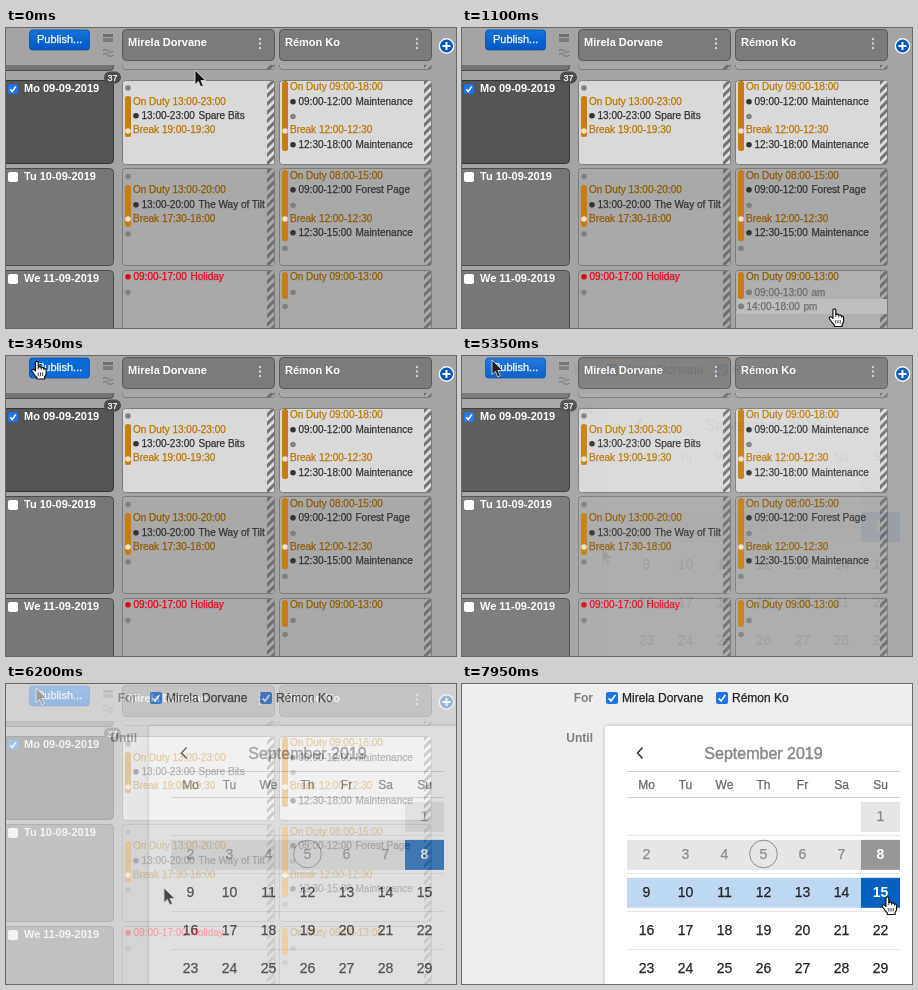
Recreate the animation shown at these times as an HTML page. Size 450 px wide and 300 px high, loop 8000 ms.

```html
<!DOCTYPE html>
<html lang="en">
<head>
<meta charset="utf-8">
<title>Roster publishing</title>
<style>
html, body { margin: 0; width: 100%; height: 100%; overflow: hidden; background: #a4a4a4; }
svg { display: block; width: 100vw; height: 100vh; font-family: "Liberation Sans", Arial, sans-serif; }
text { white-space: pre; stroke-width: .25px; }
</style>
</head>
<body>
<svg id="stage" viewBox="0 0 450 300">
  <defs>
    <linearGradient id="blue" x2="0" y2="1">
      <stop stop-color="#1672dc"/><stop offset="1" stop-color="#0058c4"/>
    </linearGradient>
    <pattern id="lightStripe" width="6" height="6" patternUnits="userSpaceOnUse" patternTransform="rotate(45)">
      <rect width="6" height="6" fill="#dcdcdc"/><rect x="3" width="3" height="6" fill="#747474"/>
    </pattern>
    <pattern id="dimStripe" width="6" height="6" patternUnits="userSpaceOnUse" patternTransform="rotate(45)">
      <rect width="6" height="6" fill="#a9a9a9"/><rect x="3" width="3" height="6" fill="#707070"/>
    </pattern>
    <filter id="soft" x="-10%" y="-10%" width="120%" height="120%"><feGaussianBlur stdDeviation="2"/></filter>
    <path id="arrow" d="M0 0V14.5L3.4 11.4L5.8 16.8L8.3 15.7L5.9 10.5H10.6Z" fill="#111" stroke="#e8e8e8" stroke-width=".8"/>
    <g id="hand" stroke="#111" stroke-width="1.2" stroke-linejoin="round">
      <path d="M-1.6 9.5V1.2Q-1.6 -.2 -.2 -.2T1.3 1.2V5.6Q3.8 4.4 4.2 6.3Q6.4 5.4 6.9 7.2Q9 6.7 9.1 8.6V12Q9 14 7.6 15.4V17.5H-.2V16Q-2.6 13.8 -4.7 10.3Q-5.9 8.4 -4.4 7.8Q-3.2 7.5 -1.6 9.5Z" fill="#fff"/>
      <path d="M1.3 11V14.5M3.5 11V14.5M5.7 11V14.5M1.3 5.5V8M4.2 6.3V8.3M6.9 7.2V8.8" stroke-width=".8"/>
    </g>
  </defs>
  <g id="roster"></g>
  <g id="dialog"></g>
</svg>
<script>
const NS = "http://www.w3.org/2000/svg";
const roster = document.getElementById("roster");
const dialog = document.getElementById("dialog");
const people = ["Mirela Dorvane", "Rémon Ko"];

function add(parent, tag, attrs, content) {
  const node = document.createElementNS(NS, tag);
  for (const key in attrs) node.setAttribute(key, attrs[key]);
  if (content !== undefined) node.textContent = content;
  parent.append(node);
  return node;
}
const box = (p, x, y, width, height, fill, more) => add(p, "rect", { x, y, width, height, fill, ...more });
const dot = (p, cx, cy, r, fill, more) => add(p, "circle", { cx, cy, r, fill, ...more });
const label = (p, x, y, size, fill, str, more) =>
  add(p, "text", { x, y, "font-size": size, fill, stroke: fill, ...more }, str);
const line = (p, d, stroke, width = 1) => add(p, "path", { d, stroke, "stroke-width": width, fill: "none" });
const bold = { "font-weight": "bold", stroke: "none" };

function checkbox(p, x, y, size, on) {
  box(p, x, y, size, size, on ? "#1d74e8" : "#fff", { rx: 2 });
  if (on) line(p, `M${x + size * .22} ${y + size * .53}l${size * .2} ${size * .22}l${size * .36} ${-size * .5}`, "#fff", 1.6);
}

// Roster
box(roster, 0, 0, 450, 300, "#a4a4a4");

function dayCell(y, height, fill, str, on) {
  box(roster, -6, y + .5, 113.5, height, fill, { rx: 4, stroke: on ? "#333" : "#4a4a4a" });
  if (!str) return;
  checkbox(roster, 2, y + 4, 10, on);
  label(roster, 18, y + 12, 11, "#fff", str, bold);
}
dayCell(20, 22, "#757575");
box(roster, 0, 0, 116, 37, "#a4a4a4");
dayCell(52, 83, "#555", "Mo 09-09-2019", true);
dayCell(140, 97, "#777", "Tu 10-09-2019");
dayCell(242, 80, "#777", "We 11-09-2019");
box(roster, 98, 43.5, 17, 12, "#4c4c4c", { rx: 6 });
label(roster, 106.5, 52.7, 9, "#fff", "37", { "text-anchor": "middle" });

function shiftCell(x, y, height, light) {
  box(roster, x - .5, y + .5, 152, height, light ? "#d9d9d9" : "#a9a9a9", { rx: 3, stroke: "#7c7c7c" });
  box(roster, x + 144, y + 1, 7, height - 1, `url(#${light ? "lightStripe" : "dimStripe"})`);
}
people.forEach((name, i) => {
  const x = 117 + i * 157;
  shiftCell(x, 20, 21);
  box(roster, x - 1, 0, 154, 37, "#a4a4a4");
  box(roster, x - .5, 1.5, 152, 31, "#7b7b7b", { rx: 4, stroke: "#575757" });
  label(roster, x + 5, 18, 11, "#fff", name, bold);
  [11, 15.5, 20].forEach(y => dot(roster, x + 137, y, 1.2, "#d0d0d0"));
  shiftCell(x, 52, 84, true);
  shiftCell(x, 140, 97);
  shiftCell(x, 242, 80);
});

// The hovered cell brightens and lists its open shifts.
const hints = add(roster, "g", {});
box(hints, 274, 243, 144, 57, "#fff", { opacity: .08 });
const hintRow = box(hints, 275, 271, 150, 15, "#bebebe");

const duty = (x, y, str, light) => label(roster, x, y, 10, light ? "#bd7600" : "#8f5a00", str);
function bar(x, y, height, pause) {
  box(roster, x, y, 6, height, "#c97d0c", { rx: 2.5 });
  if (pause) dot(roster, x + 3, pause, 2.8, "#f0dfc2");
}
function task(x, y, time, name, fill = "#333", parent = roster) {
  dot(parent, x, y - 3.3, 2.8, fill);
  label(parent, x + 5.5, y, 10, fill, time);
  label(parent, x + 62.5, y, 10, fill, name);
}
const spare = (x, y) => dot(roster, x, y, 2.8, "#808080");

spare(122, 60);
bar(119, 68, 41, 103);
duty(127, 77, "On Duty 13:00-23:00", true);
task(130, 91, "13:00-23:00", "Spare Bits");
duty(127, 105, "Break 19:00-19:30", true);

bar(276, 53, 70, 103);
duty(284, 62, "On Duty 09:00-18:00", true);
task(287, 77, "09:00-12:00", "Maintenance");
spare(287, 88.5);
duty(284, 105, "Break 12:00-12:30", true);
task(287, 120, "12:30-18:00", "Maintenance");

spare(122, 148.5);
bar(119, 157, 42, 191);
duty(127, 165, "On Duty 13:00-20:00");
task(130, 180, "13:00-20:00", "The Way of Tilt");
duty(127, 194, "Break 17:30-18:00");
spare(122, 206);

bar(276, 142, 71, 191);
duty(284, 151, "On Duty 08:00-15:00");
task(287, 165, "09:00-12:00", "Forest Page");
spare(287, 177.5);
duty(284, 194, "Break 12:00-12:30");
task(287, 208, "12:30-15:00", "Maintenance");
spare(279, 220.5);

task(122, 252, "09:00-17:00", "Holiday", "#f00014");
spare(122, 264.5);
bar(276, 244, 27);
duty(284, 252, "On Duty 09:00-13:00");
spare(287, 264.5);
spare(279, 278.5);
task(287, 267.5, "09:00-13:00", "am", "#6c6c6c", hints);
task(279, 281.5, "14:00-18:00", "pm", "#6c6c6c", hints);

const publish = box(roster, 23.5, 2, 60, 20, "url(#blue)", { rx: 3, stroke: "#0a4fa6", "stroke-width": .8 });
label(roster, 31, 15, 11, "#fff", "Publish...");
box(roster, 97, 6, 10, 3, "#707070");
box(roster, 97, 10, 10, 4, "#7b7b7b");
line(roster, "M97 23q2.5 -3 5 0t5 0M97 27q2.5 -3 5 0t5 0", "#7f7f7f", 1.3);
dot(roster, 440.5, 18, 7.2, "#0758b8", { stroke: "#f2f5f9", "stroke-width": 1.5 });
line(roster, "M436.5 18h8M440.5 14v8", "#fff", 2);

// Dialog
box(dialog, 0, 0, 450, 300, "#eee");
const right = { ...bold, "text-anchor": "end" };
label(dialog, 131, 18, 12, "#808080", "For", right);
label(dialog, 131, 58, 12, "#808080", "Until", right);
people.forEach((name, i) => {
  checkbox(dialog, 144 + i * 110, 8, 12, true);
  label(dialog, 160 + i * 110, 18, 12, "#222", name);
});
box(dialog, 143, 42, 330, 290, "#bbb", { rx: 3, filter: "url(#soft)" });
box(dialog, 143, 42, 330, 290, "#fff", { rx: 3 });
line(dialog, "M180.5 63.5l-5 5.5l5 5.5", "#333", 1.6);
const middle = { "text-anchor": "middle" };
label(dialog, 301.5, 75, 16, "#888", "September 2019", { ...middle, style: "stroke-width: .45px" });
line(dialog, "M165 87.5H438M165 113.5H438", "#cfcfcf");
line(dialog, "M165 151.5H438M165 189.5H438M165 227.5H438M165 265.5H438", "#e6e6e6");
["Mo", "Tu", "We", "Th", "Fr", "Sa", "Su"].forEach((d, i) =>
  label(dialog, 184.5 + i * 39, 105, 12, "#666", d, middle));

const days = [];
for (let d = 1; d <= 29; d++) {
  const col = (d + 5) % 7, row = Math.floor((d + 5) / 7);
  const x = 165 + col * 39, y = 118 + row * 37.9;
  const back = box(dialog, x, y, 39, 30, "none");
  const text = label(dialog, x + 19.5, y + 19, 14, "#222", d, middle);
  days[d] = { back, text };
}
dot(dialog, 301.5, 170, 13.8, "none", { stroke: "#8c8c8c" });

function paintDay(d, hover, picked) {
  let back = "none", ink = "#222", weight = "normal";
  if (d < 8) [back, ink] = ["#e6e6e6", "#8a8a8a"];
  else if (d === 8) [back, ink, weight] = [picked ? "#979797" : "#005ab8", "#fff", "bold"];
  else if (d === hover) [back, ink, weight] = [picked ? "#0560c0" : "#619fda", "#fff", "bold"];
  else if (d < hover) back = "#bfd8f1";
  const { back: tile, text } = days[d];
  tile.setAttribute("fill", back);
  text.setAttribute("fill", ink);
  text.setAttribute("stroke", weight === "bold" ? "none" : ink);
  text.setAttribute("font-weight", weight);
}

// Pointers
const pointer = parent => add(parent, "use", {});
const rosterPointer = pointer(roster), dialogPointer = pointer(dialog);
const clamp = v => Math.max(0, Math.min(1, v));
const ramp = (t, from, to) => clamp((t - from) / (to - from));
const ease = v => v * v * (3 - 2 * v);

// Each key is [time, x, y].
function along(keys, t) {
  const next = keys.findIndex(k => k[0] > t);
  if (next < 0) return keys.at(-1).slice(1);
  if (next === 0) return keys[0].slice(1);
  const a = keys[next - 1], b = keys[next];
  const p = ease(ramp(t, a[0], b[0]));
  return [a[1] + (b[1] - a[1]) * p, a[2] + (b[2] - a[2]) * p];
}
const rosterPath = [[0, 189, 42], [850, 375, 266], [950, 374, 270], [1100, 372.5, 281],
  [2100, 372.5, 281], [2900, 31, 5.5], [4800, 31, 5.5], [5050, 30, 4]];
const dialogPath = [[5900, 140, 192], [6200, 158, 204], [6650, 358.5, 214], [6900, 358.5, 214],
  [7300, 415, 213], [7650, 415, 213], [7750, 425.5, 213]];

function place(node, shape, [x, y]) {
  node.setAttribute("href", "#" + shape);
  node.setAttribute("transform", `translate(${x.toFixed(2)} ${y.toFixed(2)})`);
}

function draw(t) {
  const at = along(rosterPath, t);
  const onButton = at[0] < 84 && at[1] < 23 && t < 4900;
  place(rosterPointer, onButton || (t >= 850 && t < 2100) ? "hand" : "arrow", at);
  hints.setAttribute("opacity", ramp(t, 850, 1000) * (1 - ramp(t, 1650, 1850)));
  hintRow.setAttribute("y", at[1] < 274 ? 257 : 271);
  publish.setAttribute("fill", t >= 3400 && t < 4850 ? "#0b6ad6" : "url(#blue)");

  const mix = ramp(t, 5200, 6850);
  const fade = (mix + ease(mix)) / 2;
  dialog.setAttribute("opacity", fade);
  dialog.setAttribute("display", fade > 0 ? "inline" : "none");
  const spot = along(dialogPath, t);
  const inWeek = spot[0] >= 165 && spot[1] >= 194;
  const hover = inWeek ? Math.min(15, 9 + Math.floor((spot[0] - 165) / 39)) : 0;
  place(dialogPointer, inWeek ? "hand" : "arrow", spot);
  for (let d = 1; d < days.length; d++) paintDay(d, hover, t >= 7900);
}

function tick() {
  draw(performance.now() % 8000);
  requestAnimationFrame(tick);
}
tick();
</script>
</body>
</html>
```
